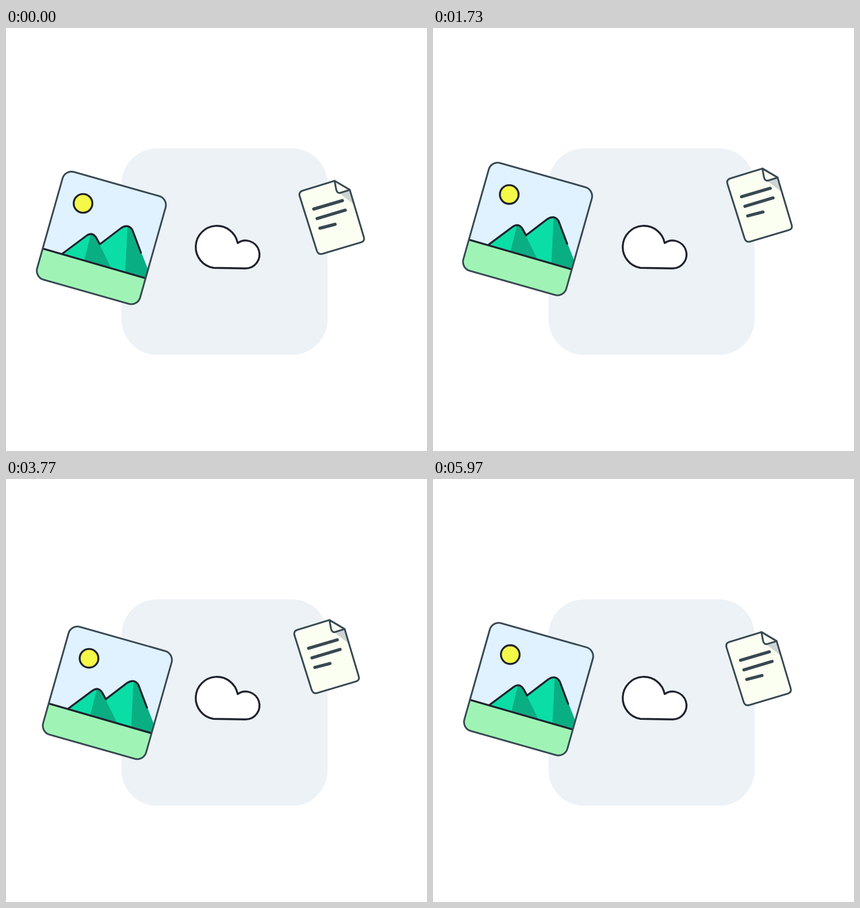
Animation of 747 by 750 pixels, one loop 6010 ms. Source, as an HTML page:

```html
<!DOCTYPE html>
<html lang="en">
<head>
<meta charset="utf-8">
<title>Upload</title>
<style>
  html, body { margin: 0; width: 100%; height: 100%; overflow: hidden; background: #fff; }
  svg { display: block; width: 747px; height: 750px; }
  .ink, .edge { stroke-linecap: round; stroke-linejoin: round; }
  .ink { stroke: #20222e; stroke-width: 3.4; }
  .edge { stroke: #384852; stroke-width: 3.1; }
  .text { stroke-width: 5.5; }
</style>
</head>
<body>
<svg viewBox="0 0 747 750" fill="none">
  <defs>
    <rect id="card" x="74.2" y="272.9" width="190" height="198.6" rx="16.5" transform="rotate(15.8 169.2 372.2)"/>
    <path id="sheet" d="M583 271L610 287L635 371Q637 378 630 380L561 400.5Q554 402 551.5 395L521 298Q519 291 526 288.5Z"/>
    <clipPath id="frame"><use href="#card"/></clipPath>
  </defs>
  <rect x="205" y="213.5" width="365.5" height="366" rx="63" fill="#ecf2f5"/>

  <path id="arrow" class="ink" d="M393.5 483V433.5M373 454.5L393.5 433L414 454.5"/>
  <path class="ink" fill="#fff" d="M368 425.3A37.5 37.5 0 1 1 411 381.3A24.7 24.7 0 1 1 425 426.3Z"/>

  <g id="picture">
    <g clip-path="url(#frame)">
      <path fill="#e0f1ff" d="M30 230H310V510H30Z"/>
      <g transform="translate(-.5 -.5)">
        <path fill="#0bdda6" d="M100 401L143 369Q154 361 161 373L167 384L205 355Q218 347 225 359L252 428L247 444Z"/>
        <path fill="#0aae83" d="M151 366Q158 367 161 373L188 428L139 414ZM216 352Q222 353 225 359L253 430L247 445L212 436Z"/>
        <path fill="#9ff4b5" d="M40 384L270 450.5V520H40Z"/>
        <path class="ink" d="M65 391.5L247 444M100 401L143 369Q154 361 161 373L167 384L205 355Q218 347 225 359L240 399"/>
      </g>
    </g>
    <circle class="ink" cx="136.7" cy="311" r="16.6" fill="#f4f948"/>
    <use href="#card" class="edge"/>
  </g>

  <g id="page">
    <use href="#sheet" fill="#fbfff1"/>
    <path fill="#cdd4d5" d="M592 293L610 287L617.5 313Z"/>
    <use href="#sheet" class="edge"/>
    <path class="edge" fill="#fbfff1" d="M583 271L586 287Q588 294 594 292L610 287Z"/>
    <path class="edge text" d="M546 321L597 306M552 338L602 323M557 355L584 348"/>
  </g>
</svg>
<script>
const LOOP = 6010, BEAT = 2000;
const $ = id => document.getElementById(id);

// Sum of harmonics [cosine, sine] that starts and ends at zero
const wave = (a, ...parts) => parts.reduce((sum, [c, s], i) => {
  const angle = a * (i + 1);
  return sum + c * (Math.cos(angle) - 1) + s * Math.sin(angle);
}, 0);

const ramp = (t, from, to) => {
  const u = Math.min(1, Math.max(0, (t - from) / (to - from)));
  return u * u * (3 - 2 * u);
};

const move = (id, x, y) => $(id).setAttribute('transform', `translate(${x} ${y})`);

function draw(now) {
  const t = now % LOOP, beat = t % BEAT, a = t / LOOP * 2 * Math.PI;
  move('picture',
    wave(a, [-4, -6.3], [0.6, -0.6], [0, -0.8]),
    wave(a, [2.4, -12.5], [0, 1.9], [-0.5, 0]));
  move('page',
    wave(a, [2.3, 6.2], [0.7, 0.2], [1, 0]),
    wave(a, [15.3, -5.8], [-1, -0.7], [0.6, -1]));
  $('arrow').setAttribute('opacity', ramp(beat, 300, 700) - ramp(beat, 1250, 1650));
  requestAnimationFrame(draw);
}

draw(0);
</script>
</body>
</html>
```
